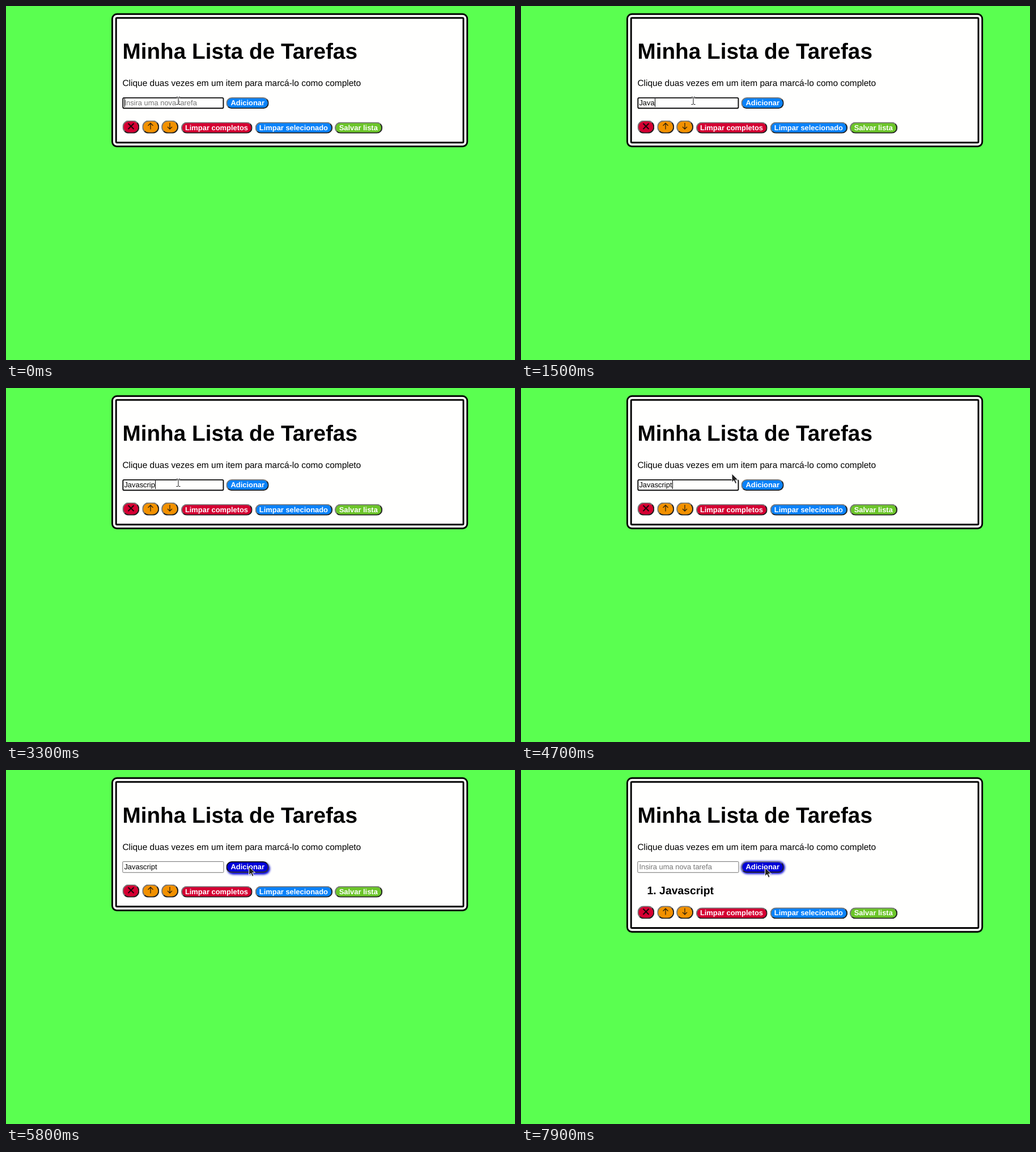
Recreate the animation shown at these times as an HTML page. Size 898x624 px, loop 8 s.

```html
<!DOCTYPE html>
<html lang="pt">
<head>
<meta charset="utf-8">
<title>Lista de Tarefas</title>
<style>
  html, body { margin: 0; width: 100%; height: 100%; overflow: hidden; background: #5aff50; }
  div { position: absolute; box-sizing: border-box; }
  #page { left: 0; top: 0; transform-origin: 0 0; transform: translate(186px, 12.8px) scale(.968); }
  #card { width: 650px; border: 10px double #000; border-radius: 10px; background: #fffffe; }
  #field { left: 20px; top: 153px; width: 185px; height: 21px; border: 1px solid #6b6b6b; border-radius: 2px; background: #fffffe; }
  #field.focus { border: 2px solid #0c0c0c; border-radius: 3px; }
  .btn { border: 2px solid; border-color: #767676 #212121 #212121 #767676; border-radius: 12px; }
  #add { left: 209.45px; top: 153px; width: 77.5px; height: 21px; background: #0a82fa; }
  #add.hover { background: #0000d8; box-shadow: 1px 1px 4px 1px #0000d8; }
  #add.down { border-color: #111 #333 #333 #111; box-shadow: 2px 3px 4px #0000d8; }
  svg { position: absolute; left: 0; top: 0; }
  text { font: 12.91px "Liberation Sans", Arial, sans-serif; text-rendering: geometricPrecision; white-space: pre; }
  .b { font-weight: bold; }
  .w { font-weight: bold; fill: #fff; }
  .icon { fill: none; stroke: #33240a; stroke-width: 1.3; }
  .cross { stroke: #1c0408; stroke-width: 2; }
</style>
</head>
<body>
<div id="page">
  <div id="card"></div>
  <div id="field"></div>
  <div id="add" class="btn"></div>
  <div id="tools"></div>
</div>
<svg width="898" height="624">
  <text class="b" x="205.4" y="93.2" style="font-size:38.72px">Minha Lista de Tarefas</text>
  <text x="205.4" y="141.4" style="font-size:15.49px">Clique duas vezes em um item para marcá-lo como completo</text>
  <text id="typed" x="208.4" y="175.3"></text>
  <rect id="caret" y="163" width="1" height="15"/>
  <text class="w" x="396.5" y="175.3">Adicionar</text>
  <text id="item" class="b" x="222.6" y="218.9" style="font-size:19.36px">1. Javascript</text>
  <g id="labels">
    <path class="icon cross" d="M215.5 207l10 10m0-10l-10 10"/>
    <path class="icon" d="M255 217.5v-11m-4.5 4.5l4.5-4.5 4.5 4.5M289 206v11m-4-4l4 4 4-4"/>
    <text class="w" x="315.9" y="218.7">Limpar completos</text>
    <text class="w" x="446.8" y="218.7">Limpar selecionado</text>
    <text class="w" x="587.7" y="218.7">Salvar lista</text>
  </g>
  <g id="beam" fill="none">
    <path d="M-3.5-6.5h2.5l1 1 1-1h2.5M0-5.5v11M-3.5 6.5h2.5l1-1 1 1h2.5" stroke="#fff" stroke-width="2.4"/>
    <path d="M-3.5-6.5h2.5l1 1 1-1h2.5M0-5.5v11M-3.5 6.5h2.5l1-1 1 1h2.5" stroke="#111"/>
  </g>
  <path id="arrow" d="M0 0V15.2L3.5 12L6 17.6L8.6 16.5L6.2 11H11Z" fill="#222" stroke="#fff"/>
</svg>
<script>
const $ = id => document.getElementById(id);
const LOOP = 8000, SCALE = .968, ROW = 39, WORD = 'Javascript';
const keys = [400, 1100, 1300, 1500, 1800, 2300, 2500, 2600, 3300, 3500];
// pointer stops: time, x, y
const stops = [[0, 304, 167], [4500, 320, 163], [4600, 346, 156], [4700, 372, 151],
  [4800, 401, 152], [4900, 425, 160.5], [5100, 428.5, 170], [7900, 430.5, 172]];
// left, top, width, height, colour
const buttons = [[20, 194.5, 31, 24, '#d50032'], [55.6, 194.5, 31, 24, '#f29100'], [91.2, 194.5, 31, 24, '#f29100'],
  [126.5, 197.5, 130.5, 21, '#d50032'], [261.5, 197.5, 141, 21, '#0a82fa'], [407, 197.5, 86.5, 21, '#6cc52a']];

for (const [x, y, w, h, color] of buttons) {
  const b = document.createElement('div');
  b.className = 'btn';
  b.style.cssText = `left:${x}px;top:${y}px;width:${w}px;height:${h}px;background:${color}`;
  $('tools').append(b);
}

const show = (id, on) => $(id).setAttribute('visibility', on ? 'visible' : 'hidden');

function draw(t) {
  const added = t >= 5900, focused = t < 5700;
  const word = added ? '' : WORD.slice(0, keys.filter(k => t >= k).length);
  const shift = added ? ROW : 0;

  $('typed').textContent = word || 'Insira uma nova tarefa';
  $('typed').setAttribute('fill', word ? '#000' : '#757575');
  $('caret').setAttribute('x', Math.round(208.8 + (word ? $('typed').getComputedTextLength() : 0)));
  show('caret', t < 4200 || t >= 4700 && t < 5100);
  $('field').className = focused ? 'focus' : '';
  $('add').className = 'btn' + (t >= 5100 ? ' hover' : '') + (focused || added ? '' : ' down');

  show('item', added);
  $('card').style.height = 243.5 + shift + 'px';
  $('tools').style.top = shift + 'px';
  $('labels').setAttribute('transform', `translate(0 ${shift * SCALE})`);

  const [, x, y] = stops.filter(s => t >= s[0]).pop();
  const overField = t < 4600;
  show('beam', overField);
  show('arrow', !overField);
  $(overField ? 'beam' : 'arrow').setAttribute('transform', `translate(${x} ${y})`);
}

const start = performance.now();
function tick() {
  draw((performance.now() - start) % LOOP);
  requestAnimationFrame(tick);
}
tick();
</script>
</body>
</html>
```
